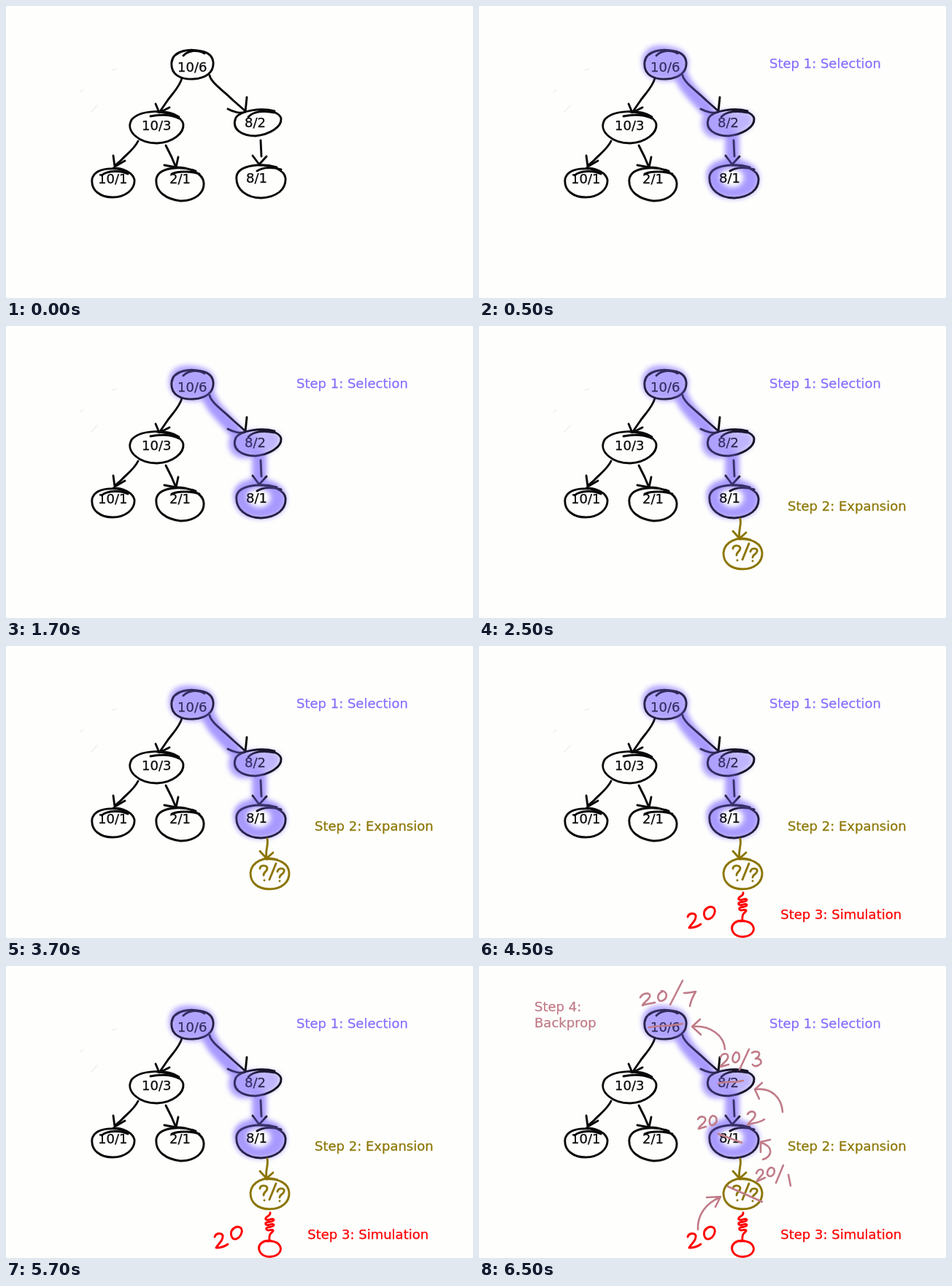
Animation, 640 px wide and 400 px high, one loop 8000 ms. Source, as an HTML page:

```html
<!DOCTYPE html>
<html lang="en">
<head>
<meta charset="utf-8">
<title>Tree search steps</title>
<style>
  html, body { margin: 0; width: 100%; height: 100%; overflow: hidden; background: #fefefd; }
  svg { display: block; width: 100%; height: 100%; }
  path { fill: none; stroke: currentColor; stroke-width: 2.9; stroke-linecap: round; stroke-linejoin: round; }
  text { font: 18px "DejaVu Sans", Verdana, sans-serif; fill: currentColor; stroke: currentColor; stroke-width: .25; }
  .step { visibility: hidden; }
  #glow path { stroke: none; fill: #8470ff; }
  #glow .band { fill: none; stroke: #8470ff; stroke-width: 18; }
  .specks path { stroke-width: 1.5; }
  .thin path { stroke-width: 2.6; }
</style>
</head>
<body>
<svg viewBox="0 0 640 400">
  <defs>
    <filter id="blur" x="-20%" y="-20%" width="140%" height="140%"><feGaussianBlur stdDeviation="3.5"/></filter>
    <g id="glow" filter="url(#blur)">
      <path opacity=".85" d="M224 75C226 53 248 53 262 56C285 60 289 72 285 88C279 105 250 104 238 99C227 94 224 85 224 75Z"/>
      <path class="band" d="M278 97C283 112 298 124 313 142"/>
      <path opacity=".65" d="M308 160C306 143 330 143 348 143C367 142 378 147 376 156C374 169 358 177 343 179C322 181 309 178 308 160Z"/>
      <path opacity=".7" d="M305 161C305 143 326 141 340 149C351 158 347 176 336 180C320 184 306 178 305 161Z"/>
      <path class="band" d="M347 180L347 212"/>
      <path fill-rule="evenodd" d="M313 236C309 215 333 208 350 210C376 213 385 226 383 240C381 256 366 263 350 263C330 263 316 257 313 236ZM330 230C328 241 337 249 347 249C359 249 365 241 363 231C360 220 334 219 330 230Z"/>
    </g>
  </defs>

  <g class="step specks" data-at="0" data-until="6500" color="#efefed">
    <path d="M145 88L151 86M117 145L125 136M102 118L106 115"/>
  </g>
  <use class="step" data-at="500" href="#glow" opacity=".5"/>

  <g color="#080808">
    <path d="M243 68C250 60 264 60 272 65M271 63C252 57 229 61 227 77C225 95 241 101 257 100C274 99 285 91 284 77C283 67 274 62 262 61"/>
    <path d="M198 151C213 148 228 149 237 154M237 152C222 141 183 142 172 156C163 172 183 188 207 188C229 187 244 174 243 162C241 151 223 146 207 145"/>
    <path d="M332 152C339 144 354 143 368 146M368 144C350 139 322 143 315 153C308 170 325 178 342 178C361 176 378 166 377 154C375 146 361 142 348 142"/>
    <path d="M131 232C139 225 157 225 167 230M168 228C153 220 122 220 118 237C116 253 130 262 146 262C164 262 177 251 176 238C174 228 160 222 147 222"/>
    <path d="M227 230C238 225 255 227 265 230M260 226C241 219 209 220 206 237C204 255 221 265 239 267C258 267 272 257 271 242C270 229 251 221 233 221"/>
    <path d="M344 226C353 220 367 221 377 224M371 221C352 215 319 217 316 233C314 252 331 263 350 263C371 262 384 251 383 236C382 224 363 218 347 218"/>
    <path d="M241 99C238 111 227 121 221 130L212 143M205 134L210 146L224 139"/>
    <path d="M279 95C281 105 298 116 311 129L327 143M330 125L328 145C322 148 311 145 304 141"/>
    <path d="M181 185C176 196 164 204 158 211L151 217M147 205L149 220L163 212"/>
    <path d="M219 191L227 207L232 219M236 207L233 221L217 218"/>
    <path d="M349 184L350 206M338 205L347 217L357 206"/>
    <text x="235" y="90">10/6</text>
    <text x="186" y="170">10/3</text>
    <text x="327" y="166">8/2</text>
    <text x="126" y="243">10/1</text>
    <text x="224" y="243">2/1</text>
    <text x="329" y="242">8/1</text>
  </g>

  <g class="step" data-at="500" color="#8470ff">
    <use href="#glow" opacity=".42"/>
    <text x="398" y="85">Step 1: Selection</text>
  </g>

  <g class="step" data-at="2500" color="#8b7500">
    <path d="M358 264C360 274 355 280 357 290M348 281L357 291L366 283"/>
    <path d="M372 293C354 287 336 296 335 311C335 325 346 333 361 333C378 333 389 323 388 310C387 298 374 291 357 292"/>
    <path d="M348 305C348 299 359 300 358 305C357 310 353 309 353 314M354 321h.1M361 320L370 298M372 309C373 303 383 304 381 309C379 314 375 313 375 317M375 322h.1"/>
    <text x="423" y="253">Step 2: Expansion</text>
  </g>

  <g class="step" data-at="4500" color="#f00">
    <path d="M362 338C363 343 354 343 356 347C358 350 367 344 367 348C366 352 354 349 356 354C358 357 367 351 367 355C366 359 355 356 357 361C359 364 367 359 366 363C364 366 360 366 361 376"/>
    <path d="M365 377C352 374 345 382 347 389C349 396 356 399 364 398C373 397 378 391 376 385C374 379 367 376 358 377"/>
    <path d="M286 371C288 365 298 365 297 371C297 377 291 380 288 386C294 386 300 384 304 381M311 360C306 366 309 375 315 374C322 372 325 363 322 359C318 356 313 357 310 362"/>
    <text x="413.3" y="374">Step 3: Simulation</text>
  </g>

  <g class="step thin" data-at="6500" color="#c07c88">
    <text x="76" y="62">Step 4:</text>
    <text x="76" y="84">Backprop</text>
    <path d="M221 43C225 36 236 36 234 42C232 47 225 50 224 54C230 51 235 52 241 50M251 35C243 39 244 48 250 48C258 46 260 35 250 34M262 53L279 20M281 37C287 37 292 36 297 35C293 42 290 48 289 55"/>
    <path d="M331 125C334 118 343 119 341 126C339 132 333 133 331 138L342 135M352 118C346 123 346 133 352 132C358 129 359 119 352 118M357 142L370 114M374 119C380 115 387 118 383 124L379 127C387 126 389 133 383 136C379 138 376 137 375 135"/>
    <path d="M300 210C303 204 312 206 310 212C308 217 302 218 301 223L311 220M320 205C314 209 315 219 320 218C327 216 328 206 320 205M368 203C372 197 381 199 378 206C376 211 370 213 368 218C375 214 383 216 391 210"/>
    <path d="M380 284C383 276 391 278 389 284C387 289 382 290 381 295L392 290M400 276C394 279 393 289 400 288C406 286 407 276 400 276M407 297L417 273M424 286L427 301"/>
    <path d="M233 84C248 81 264 83 279 79M328 161C338 157 348 161 362 157M328 230L360 242M341 302L388 323"/>
    <path d="M337 114C336 96 318 81 293 83M303 73L292 83L304 94"/>
    <path d="M416 200C415 181 401 166 379 169M388 160L378 169L384 182"/>
    <path d="M389 265C401 262 405 248 387 242M386 255L386 241L399 238"/>
    <path d="M300 361C299 341 311 325 330 317M312 317L331 316L324 330"/>
  </g>
</svg>
<script>
  const LOOP = 8000;
  const steps = document.querySelectorAll(".step");

  function draw(now) {
    const t = now % LOOP;
    for (const step of steps) {
      const { at, until = LOOP } = step.dataset;
      step.style.visibility = t >= at && t < until ? "visible" : "hidden";
    }
    requestAnimationFrame(draw);
  }
  draw(performance.now());
</script>
</body>
</html>
```
